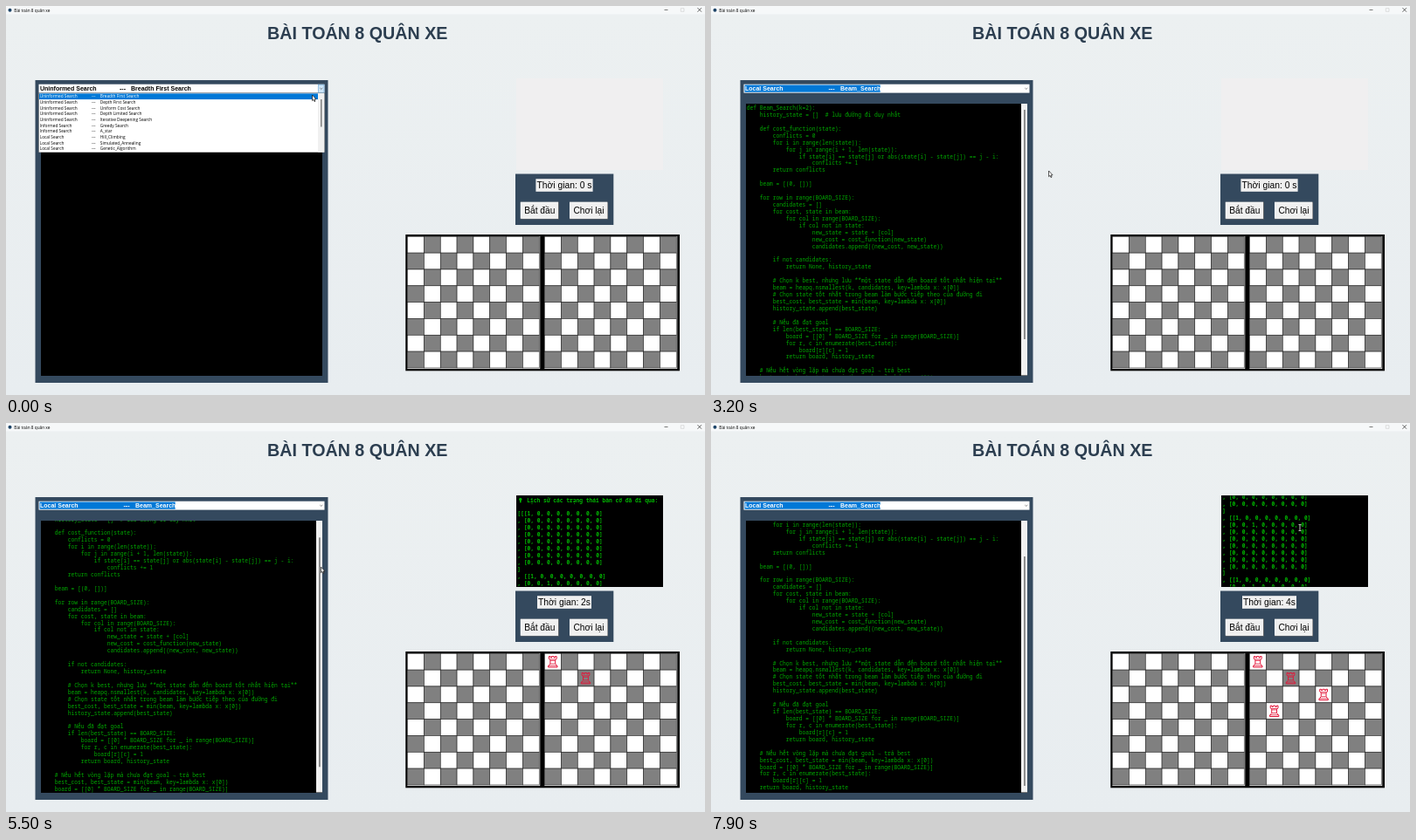
Recreate the animation shown at these times as an HTML page with a canvas. Size 800 by 446 pixels, loop 8000 ms.

```html
<!DOCTYPE html>
<html lang="vi">
<head>
<meta charset="utf-8">
<title>Bài toán 8 quân xe</title>
<style>
html, body { margin: 0; width: 100%; height: 100%; overflow: hidden; background: #ebeff1; }
canvas { display: block; }
</style>
</head>
<body>
<canvas id="stage" width="800" height="446"></canvas>
<script>
const c = document.getElementById('stage').getContext('2d');
const LOOP = 8000, CLOSE = 2800, START = 3800, STEP = 1050;
const SANS = '"Liberation Sans", Arial, sans-serif';
const UI = '"Open Sans", "Noto Sans", sans-serif';
const MONO = '"Noto Sans Mono", "DejaVu Sans Mono", monospace';
const NAVY = '#34495e', BLUE = '#0078d7', FACE = '#f0f0f0';
const LINE = 7.93, ROW = 6.67, LIST_TOP = 100.4;

const OPTIONS = [
  ...['Breadth First Search', 'Depth First Search', 'Uniform Cost Search',
    'Depth Limited Search', 'Iterative Deepening Search'].map(n => ['Uninformed Search', n]),
  ...['Greedy Search', 'A_star'].map(n => ['Informed Search', n]),
  ...['Hill_Climbing', 'Simulated_Annealing', 'Genetic_Algorithm', 'Beam_Search'].map(n => ['Local Search', n]),
  ...['DFS_And_Or', 'Belief_State_Search', 'Partial_Observable_Search'].map(n => ['Complex Environment Search', n])
];

const CODE = `def Beam_Search(k=2):
    history_state = []  # lưu đường đi duy nhất

    def cost_function(state):
        conflicts = 0
        for i in range(len(state)):
            for j in range(i + 1, len(state)):
                if state[i] == state[j] or abs(state[i] - state[j]) == j - i:
                    conflicts += 1
        return conflicts

    beam = [(0, [])]

    for row in range(BOARD_SIZE):
        candidates = []
        for cost, state in beam:
            for col in range(BOARD_SIZE):
                if col not in state:
                    new_state = state + [col]
                    new_cost = cost_function(new_state)
                    candidates.append((new_cost, new_state))

        if not candidates:
            return None, history_state

        # Chọn k best, nhưng lưu **một state dẫn đến board tốt nhất hiện tại**
        beam = heapq.nsmallest(k, candidates, key=lambda x: x[0])
        # Chọn state tốt nhất trong beam làm bước tiếp theo của đường đi
        best_cost, best_state = min(beam, key=lambda x: x[0])
        history_state.append(best_state)

        # Nếu đã đạt goal
        if len(best_state) == BOARD_SIZE:
            board = [[0] * BOARD_SIZE for _ in range(BOARD_SIZE)]
            for r, c in enumerate(best_state):
                board[r][c] = 1
            return board, history_state

    # Nếu hết vòng lặp mà chưa đạt goal → trả best
    best_cost, best_state = min(beam, key=lambda x: x[0])
    board = [[0] * BOARD_SIZE for _ in range(BOARD_SIZE)]
    for r, c in enumerate(best_state):
        board[r][c] = 1
    return board, history_state`.split('\n');

const ROOKS = [0, 2, 4, 1];  // column of the rook in each row

// One printed board per search step, with the first n rows filled
const HISTORY = ['  Lịch sử các trạng thái bàn cờ đã đi qua:', ''];
for (let n = 1; n <= 3; n++) {
  for (let r = 0; r < 8; r++) {
    const cells = Array.from({ length: 8 }, (_, col) => +(r < n && ROOKS[r] === col)).join(', ');
    HISTORY.push((r ? ', [' : n === 1 ? '[[[' : ', [[') + cells + ']');
  }
  HISTORY.push(']');
}

// Pointer keys: time, x, y
const POINTER = [
  [0, 350.5, 102], [200, 350.5, 102], [900, 292.5, 139.5], [1100, 292.5, 139.5],
  [2300, 186.5, 146.8], [2850, 186.5, 146.8], [3600, 614, 237], [4500, 614, 237],
  [5100, 360.5, 153], [5500, 360.5, 165], [5950, 360.5, 187], [6450, 674, 120]
];
const CODE_SCROLL = [[5100, 0], [5500, 14.3], [5950, 39.7]];
const WHEEL = [6900, 7100, 7400, 7700];

function track(keys, t) {
  const i = keys.findIndex(k => k[0] > t);
  if (i < 0) return keys[keys.length - 1].slice(1);
  if (!i) return keys[0].slice(1);
  const a = keys[i - 1], b = keys[i], u = (t - a[0]) / (b[0] - a[0]);
  return a.slice(1).map((v, j) => v + (b[j + 1] - v) * u);
}

function box(x1, y1, x2, y2, fill) {
  c.fillStyle = fill;
  c.fillRect(x1, y1, x2 - x1, y2 - y1);
}

function text(s, x, y, font, fill = '#000', align = 'left') {
  c.font = font;
  c.fillStyle = fill;
  c.textAlign = align;
  c.fillText(s, x, y);
}

function stroke(points, color, width = 1, closed = false, fill) {
  c.beginPath();
  points.forEach(([x, y]) => c.lineTo(x, y));
  if (closed) c.closePath();
  if (fill) { c.fillStyle = fill; c.fill(); }
  c.strokeStyle = color;
  c.lineWidth = width;
  c.stroke();
}

function clipped(x1, y1, x2, y2, draw) {
  c.save();
  c.beginPath();
  c.rect(x1, y1, x2 - x1, y2 - y1);
  c.clip();
  draw();
  c.restore();
}

function windowFrame() {
  const g = c.createLinearGradient(0, 10, 0, 446);
  g.addColorStop(0, '#ecf0f1');
  g.addColorStop(1, '#e8edf0');
  box(0, 0, 800, 446, g);
  box(0, 0, 800, 9.5, '#f6f8f9');
  c.fillStyle = '#1d4468';
  c.beginPath();
  c.arc(4.5, 4.7, 2, 0, 7);
  c.fill();
  text('Bài toán 8 quân xe', 9.3, 6.7, '4.75px ' + UI);
  stroke([[753.5, 4.5], [757.5, 4.5]], '#444', .7);
  stroke([[772.3, 2.7], [776, 2.7], [776, 6.3], [772.3, 6.3]], '#ccc', .6, true);
  stroke([[791.5, 2.2], [796, 6.7]], '#222', .7);
  stroke([[796, 2.2], [791.5, 6.7]], '#222', .7);
  text('BÀI TOÁN 8 QUÂN XE', 402.3, 37.8, 'bold 19.7px ' + SANS, '#2c3e50', 'center');
}

function combo(open) {
  const font = 'bold 7px ' + SANS;
  box(37.5, 89.7, 364.5, 99.6, '#fff');
  if (open) {
    box(357, 90, 364.2, 99.4, '#cce4f7');
    c.strokeStyle = '#5a9bd0';
    c.lineWidth = .5;
    c.strokeRect(357.2, 90.2, 6.8, 9);
  } else box(38.5, 90.5, 193.7, 98.7, BLUE);
  const [kind, name] = OPTIONS[open ? 0 : 10], ink = open ? '#000' : '#fff';
  text(kind, 39, 97.1, font, ink);
  text('---', open ? 130 : 134.5, 97.1, font, ink);
  text(name, open ? 143 : 148, 97.1, font, ink);
  stroke([[359.3, 94], [360.8, 95.4], [362.3, 94]], '#555', .7);
}

function dropdown(first, mouseY) {
  const hover = Math.floor((mouseY - LIST_TOP) / ROW);
  box(37.3, 99.7, 364.7, 168, '#777');
  box(37.8, 100.2, 364.2, 167.5, '#fff');
  box(357, 100.2, 364.2, 167.5, FACE);
  const thumb = 107 + first * 2.5;
  box(360, thumb, 361.6, thumb + 31.5, '#858585');
  for (let i = 0; i < 10; i++) {
    const [kind, name] = OPTIONS[first + i], y = LIST_TOP + i * ROW;
    const ink = i === hover ? '#fff' : '#000', font = '4.75px ' + UI;
    const shift = kind.startsWith('Complex') ? 11.3 : 0;
    if (i === hover) box(38, y, 357, y + ROW, BLUE);
    text(kind, 38.7, y + 5, font, ink);
    text('---', 98 + shift, y + 5, font, ink);
    text(name, 107.8 + shift, y + 5, font, ink);
  }
}

function codePanel(scroll) {
  box(355, 112, 362, 423.5, FACE);
  box(358, 119 + scroll * .857, 359.8, 382 + scroll * .857, '#858585');
  clipped(40, 112, 355, 423.5, () => CODE.forEach((s, i) =>
    text(s, 40.7, 119 + i * LINE - scroll, '6.25px ' + MONO, '#00a800')));
}

function historyPanel(scroll) {
  box(584, 83, 752, 188, '#000');
  clipped(584.5, 83.5, 751.5, 187.5, () => {
    c.translate(0, -scroll);
    HISTORY.forEach((s, i) => text(s, i ? 585.2 : 588.7, 90.5 + i * LINE, '600 6.25px ' + MONO, '#00b400'));
    c.beginPath();
    c.arc(588.8, 87.5, 1.7, 0, 7);
    c.fill();
    c.fillRect(588, 89, 1.6, 2.3);
  });
}

function button(label, x1, x2) {
  box(x1, 224.7, x2, 244.5, '#6d6d6d');
  box(x1, 224.7, x2 - .8, 243.7, '#fff');
  box(x1 + .8, 225.5, x2 - .8, 243.7, FACE);
  text(label, (x1 + x2) / 2, 238.4, '10.2px ' + SANS, '#000', 'center');
}

function controls(seconds) {
  box(583, 192.5, 695.3, 251, NAVY);
  const half = seconds ? 31 : 32.6;
  box(639 - half, 198.2, 639 + half, 212.8, FACE);
  text(`Thời gian: ${seconds || '0 '}s`, 639, 209, '10.3px ' + SANS, '#000', 'center');
  button('Bắt đầu', 588.8, 632.8);
  button('Chơi lại', 645, 689);
}

function board(x, y = 264.3, size = 18.83) {
  box(x - .3, y - .3, x + 8 * size + 1, y + 8 * size + 1, '#fff');
  c.strokeStyle = '#222';
  c.lineWidth = .6;
  for (let i = 0; i < 64; i++) {
    const col = i % 8, row = i >> 3;
    c.fillStyle = (col + row) % 2 ? '#808080' : '#fff';
    c.fillRect(x + col * size, y + row * size, size, size);
    c.strokeRect(x + col * size, y + row * size, size, size);
  }
}

function rook(x, y) {
  const red = '#e3173a';
  const side = [[-1.3, -4.6], [-2.6, -4.6], [-2.6, -6], [-4.4, -6], [-4.4, -3.2], [-2.9, -1.9],
    [-2.9, 2.6], [-4.2, 3.8], [-4.2, 4.8], [-5.2, 4.8], [-5.2, 6.4]];
  const mirror = side.map(([a, b]) => [-a, b]).reverse();
  c.save();
  c.translate(x, y);
  stroke([...mirror, [1.3, -6], [-1.3, -6], ...side], red, 1, true);
  for (const [w, h] of [[3.6, -2.6], [2.7, -1.2], [2.7, 2.4], [4.2, 4.6]]) stroke([[-w, h], [w, h]], red, .8);
  c.restore();
}

function pointer(x, y, beam) {
  if (beam) {
    stroke([[x, y - 3.5], [x, y + 3.5]], '#ddd', .9);
    for (const dy of [-3.5, 3.5]) stroke([[x - 1.5, y + dy], [x + 1.5, y + dy]], '#ddd', .8);
    return;
  }
  const arrow = [[0, 0], [0, 6.6], [1.5, 5.3], [2.5, 7.6], [3.5, 7.1], [2.5, 4.9], [4.5, 4.8]];
  stroke(arrow.map(([a, b]) => [x + a, y + b]), '#111', .7, true, '#fff');
}

function draw(t) {
  const [x, y] = track(POINTER, t);
  const open = t < CLOSE, started = t >= START;
  const seconds = started ? Math.floor((t - START) / STEP) + 1 : 0;

  windowFrame();
  box(33.5, 85, 368.5, 432, NAVY);
  box(40, 112, 362, 424, '#000');
  combo(open);
  if (open) dropdown(t < 700 ? 0 : 4, y);
  else codePanel(track(CODE_SCROLL, t)[0]);

  if (started) historyPanel(WHEEL.filter(w => w <= t).length * 16.67);
  else box(584, 83, 752, 188, '#f0eff0');
  controls(seconds);

  box(457.3, 262, 771, 418.3, '#000');
  board(459.6);
  board(616.6);
  ROOKS.slice(0, seconds).forEach((col, row) => rook(625.8 + col * 18.83, 273.6 + row * 18.83));

  const overCode = !open && x > 40 && x < 355 && y > 112;
  const overHistory = started && x > 584 && y < 188;
  pointer(x, y, overCode || overHistory);
}

const begin = performance.now();
function tick() {
  draw((performance.now() - begin) % LOOP);
  requestAnimationFrame(tick);
}
tick();
</script>
</body>
</html>
```
